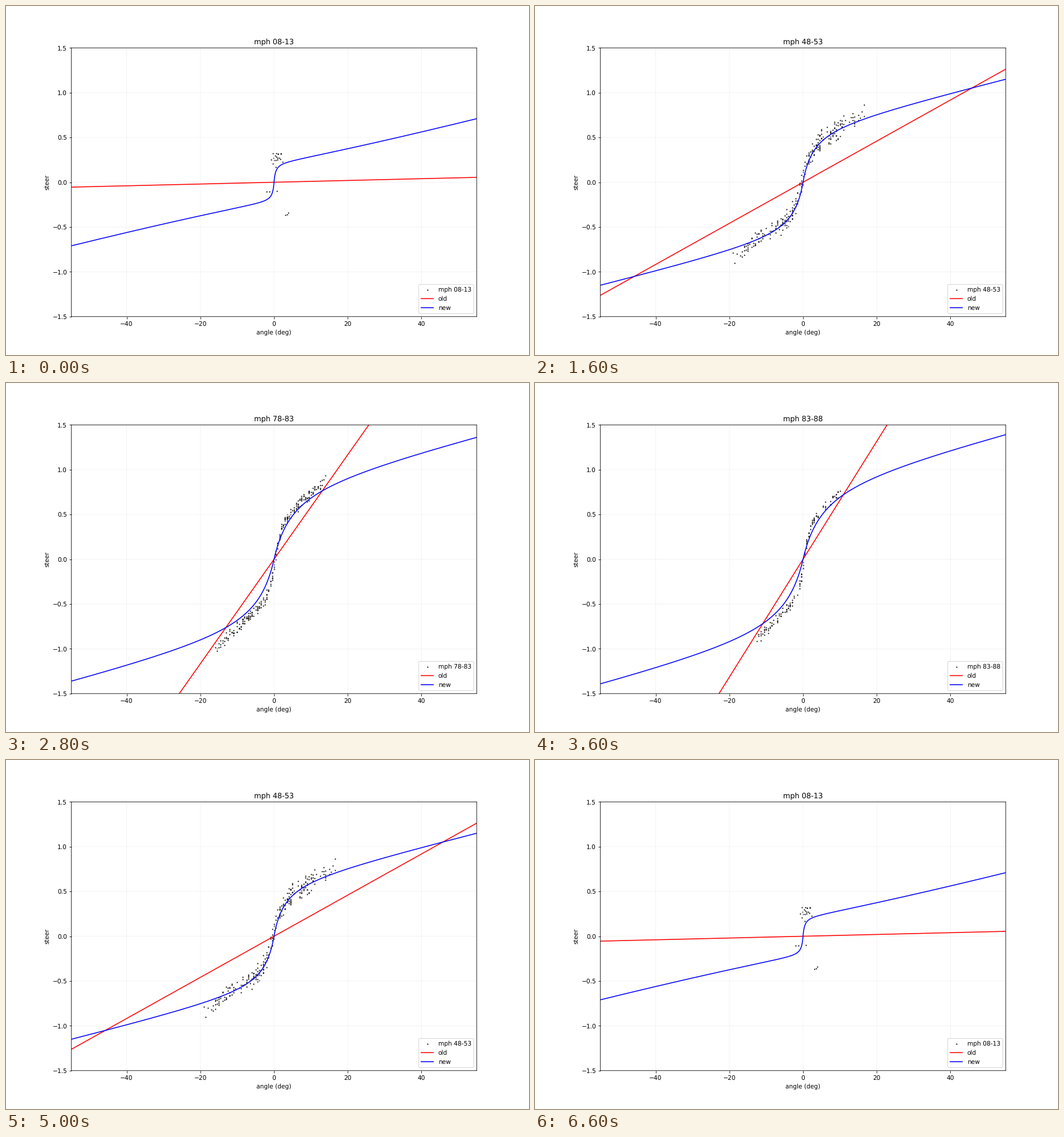
Recreate the animation shown at these times as a matplotlib script. Size 917x611 px, loop 6800 ms.

```python
import numpy as np
import matplotlib.pyplot as plt
from matplotlib.animation import FuncAnimation

plt.rcParams.update({"text.hinting": "none", "path.snap": False})

DPI = 76.4
EPS = 1e-6  # keeps the pixel size from rounding down
STARTS = list(range(8, 89, 5))
ORDER = STARTS + STARTS[::-1]


def logistic_drop(v, middle, width):
    return 1 / (1 + np.exp((v - middle) / width))


def old_steer(x, v):
    return 9.0e-6 * v**2 * x


def new_steer(x, v):
    """Sigmoid plus a nearly linear term, both growing with speed v in mph."""
    a = np.abs(x)
    ka = 38 * v**-1.2 * a
    bend = 0.0462 * v**0.672 * ka / (1 + ka)
    rise = 0.42 * v**0.063 * (a / 55)**(1 + 1.4 / v)
    return np.sign(x) * (bend + rise)


def slow_samples(rng):
    """Three small clumps: count, centre and spread of each."""
    clumps = [(19, (1.1, 0.26), (0.8, 0.04)),
              (3, (-0.1, -0.09), (0.8, 0.01)),
              (3, (3.5, -0.36), (0.4, 0.02))]
    return np.vstack([rng.normal(mid, dev, (n, 2)) for n, mid, dev in clumps])


def samples(start):
    rng = np.random.default_rng(start)
    if start == STARTS[0]:
        return slow_samples(rng)
    v = start + 2.5
    slow = logistic_drop(v, 42, 5)    # wide, shifted cloud at low speed
    fade = logistic_drop(v, 85, 3)    # fewer samples at top speed
    count = int(320 * (1 - np.exp(-v / 35)) * fade)
    reach = 8 + 8.5 * fade + 11 * slow
    shape = 1.2 + 3.2 * slow
    x = -1 - 2 * slow + reach * (2 * rng.beta(shape, shape, count) - 1)
    x = np.round(2 * x) / 2
    dx = x - 0.3 + 4.8 * slow
    noise = 0.17 * np.exp(-v / 48) * np.clip(rng.normal(size=count), -2, 2)
    y = 0.0005 * v * dx + 0.35 * np.tanh(dx * v / 130) + noise
    return np.column_stack([x, y])


POINTS = {start: samples(start) for start in STARTS}
angle = np.linspace(-55, 55, 1101)

fig, ax = plt.subplots(figsize=((917 + EPS) / DPI, (611 + EPS) / DPI), dpi=DPI)
dots = ax.scatter([0], [0], s=1, color="black", label="mph 08-13")
old_line, = ax.plot(angle, 0 * angle, color="red", label="old")
new_line, = ax.plot(angle, 0 * angle, color="blue", label="new")
ax.set(xlim=(-55, 55), ylim=(-1.5, 1.5), xlabel="angle (deg)", ylabel="steer")
ax.grid(color="0.95")
title = ax.set_title("mph 08-13")
legend = ax.legend(loc="lower right")


def update(i):
    start = ORDER[i]
    v = start + 2.5
    name = f"mph {start:02d}-{start + 5:02d}"
    dots.set_offsets(POINTS[start])
    old_line.set_ydata(old_steer(angle, v))
    new_line.set_ydata(new_steer(angle, v))
    title.set_text(name)
    legend.get_texts()[0].set_text(name)
    return dots, old_line, new_line, title, legend


anim = FuncAnimation(fig, update, frames=len(ORDER), interval=200, repeat=True, repeat_delay=0)
plt.show()
```
